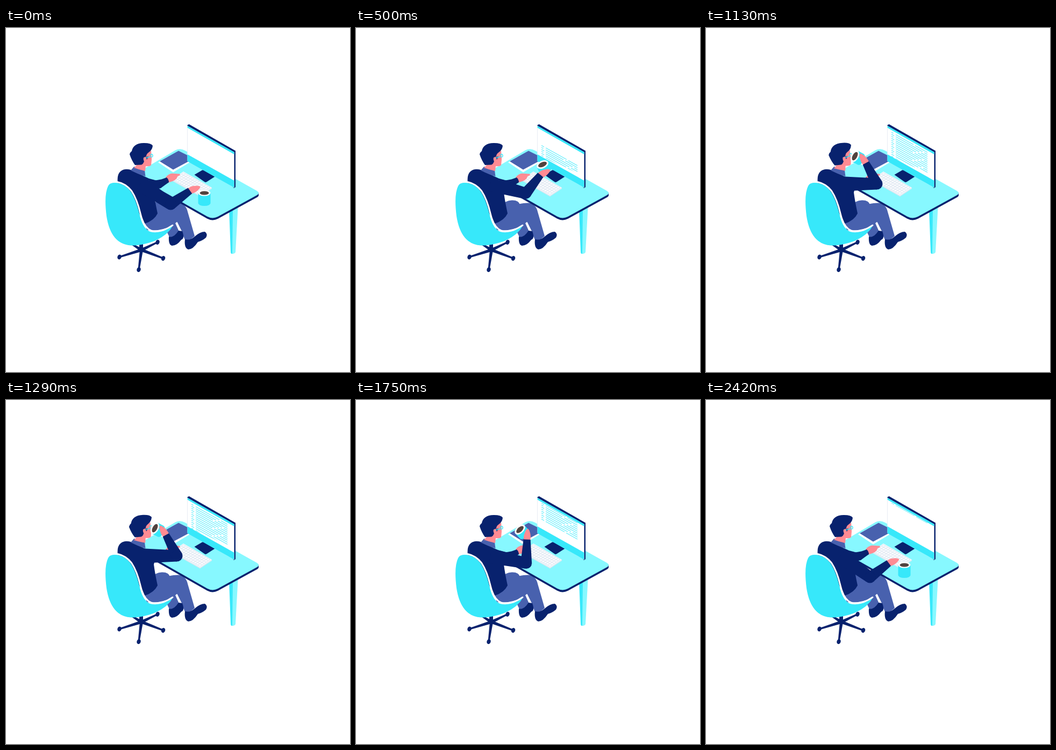
Animation of 640 by 640 pixels, one loop 2710 ms. Source, as an HTML page:

```html
<!DOCTYPE html>
<html lang="en">
<head>
<meta charset="utf-8">
<title>Coffee break</title>
<style>
  html, body { margin: 0; width: 100%; height: 100%; overflow: hidden; background: #fff; }
  svg { display: block; width: 100vw; height: 100vh; }
  .navy { fill: #08226e; }
  .indigo { fill: #4861ae; }
  .cyan { fill: #37e8fa; }
  .light { fill: #87f8ff; }
  .skin { fill: #ff8b93; }
  .white { fill: #fff; }
  .line { fill: none; stroke: #37e8fa; }
</style>
</head>
<body>
<svg viewBox="0 0 640 640">
  <defs>
    <clipPath id="page"><path d="M343 190L413 229V270L343 239Z"/></clipPath>
    <path id="top" d="M250 280V266L315 227.500Q324 223 333 228L466 302.500Q474 307 466 311.500L394 351Q384 356 374 350.500Z"/>
  </defs>

  <!-- Legs and shoes -->
  <g class="indigo">
    <path d="M270 330Q278 321 290 320.500Q303 320 305 329L322 377Q315 390 304 389L296 372Z"/>
    <path d="M257 362L283 333Q305 325 322 325.500Q335 328 338 342L351 387Q343 396 333 394L318 361L308 367Q290 379 262 376Z"/>
  </g>
  <path class="white" d="M315 363L318.500 361L327 378L322 378.500Z"/>
  <g class="navy">
    <path d="M333 393Q342 396 351 388Q361 379 370 379Q376 383 372 390Q365 396 357 398Q348 412 339 412Q331 409 333 393Z"/>
    <path d="M303 388Q312 391 321 377L328 378Q333 392 326 394Q318 405 309 405Q302 404 303 388Z"/>
  </g>

  <!-- Desk -->
  <path class="cyan" d="M415 336H423V420H420Q418 420 418 416Z"/>
  <path class="light" d="M422 334H431.500L427 417Q426 420 421 420Z"/>
  <use href="#top" class="navy" y="4"/>
  <path class="navy" d="M460 306H470V312L460 318Z"/>
  <use href="#top" class="light"/>
  <path class="white" d="M283 250L300 240L341 246V250.500L311 268.500Z"/>
  <path class="indigo" d="M286 248L321 228.500L340 238V248L311 263.500Z"/>
  <path class="navy" d="M350.500 273L365 264.500Q367 264 368 264.500L388.500 276.500L373 286.500Q371 287.500 369 286Z"/>
  <path fill="#dfe7f1" d="M308.500 282L361 311L383 297V299L361 313.500L308.500 284Z"/>
  <path fill="#fafbfd" d="M308.500 282L330 267L383 297L361 311.500Z"/>
  <path id="keys" fill="none" stroke="#d9e3ef" stroke-width=".9"/>

  <!-- Monitor -->
  <path class="navy" d="M337 181L340.500 179L427 228.500V296L424 298Z"/>
  <path class="white" d="M337.500 182L424.500 231V297L337.500 247Z"/>
  <path class="cyan" d="M337.500 182L424.500 231V235L337.500 185.500Z"/>
  <path class="cyan" d="M337.500 235L424.500 284V297L337.500 248Z"/>
  <path d="M337.500 185V235" stroke="#e4e9f1" stroke-width=".8"/>
  <g clip-path="url(#page)"><path id="text" class="line"/></g>

  <!-- Body -->
  <path class="navy" d="M208 289Q205 266 221 263Q231 262 238 267L266 280L281 284L275 306Q277 322 282 345Q276 358 258 364L230 312Z"/>
  <path class="indigo" d="M232 265L238 258Q250 260 258 265L259.500 276Q246 272 232 265Z"/>
  <g id="head">
    <path class="skin" d="M238 260Q244 256 246 248L258 236L270 228L271 245L270 255Q268 258 260 257L259 266Q249 264 238 260Z"/>
    <path class="navy" d="M230 235Q231 231 234 229Q237 214 257 214Q270 214 273 219Q272 227 266 231Q261 234 261 239L256 241Q255 246 257 248Q255 254 251 254.500L240 255Q234 247 230 235Z"/>
    <path class="navy" d="M260 240L265 239L262 245Z"/>
    <path class="line" stroke-width="1.400" d="M260 242L269 239M268.500 237.500A2.300 2.300 0 1 1 273 237.500A2.300 2.300 0 1 1 268.500 237.500"/>
  </g>

  <!-- Resting arm -->
  <path class="skin" d="M297 278Q302 271 309 270.500L323 271.500Q326 273.500 319 276Q318 282 310 285L301 288Z"/>
  <path class="navy" d="M260 280L278 283.500Q290 282 299 278Q303 282 303 287Q293 294 288 298L265 303Z"/>

  <!-- Drinking arm -->
  <g id="mug">
    <path id="cup" class="cyan"/>
    <ellipse id="rim" class="white" rx="11.500"/>
    <ellipse id="coffee" fill="#51433f" rx="8.500"/>
  </g>
  <path id="hand" class="skin" d="M-3 -5Q4 -8 11 -6Q19 -5 20.500 -1Q18 2 13 4Q6 7 -2 6Z"/>
  <g id="arm" class="navy"></g>

  <!-- Chair -->
  <path d="M251.500 400V412" stroke="#08226e" stroke-width="7"/>
  <g id="base" class="navy"></g>
  <path class="cyan" d="M190 294Q194 286 206 288Q221 290 232 304Q242 320 248 345Q254 373 268 379Q288 384 310 368C304 381 280 404 232 404.500Q195 402 187 350Q182 310 190 294Z"/>
  <path d="M189 291Q196 285 207 286.500Q222 289 233.500 303Q244 319 250 345Q256 371 270 377Q288 382 310 367" fill="none" stroke="#fff" stroke-width="3" stroke-linecap="round"/>
</svg>
<script>
const LOOP = 2710, STEP = 1000 / 24, LAST_STEP = 58;
const $ = id => document.getElementById(id);
const set = (id, name, value) => $(id).setAttribute(name, value);
const mix = (a, b, k) => a + (b - a) * k;

// Pose: upper arm, forearm and hand angles, mug x, y and tilt, lift
const rest = [34, -35, -17, 369, 307, 0, 0];
const reach = [15, -51, -24, 347, 254, -24, 1];
const raise = [11.5, -88, -82, 305, 241, -43, 1];
const sip = [0, -118, -118, 277, 238.5, -62, 1];
const away = [36, -37, -17, 369, 307, 0, 0];
const armKeys = [[0, rest], [60, rest], [500, reach], [640, raise], [800, sip],
  [1520, sip], [1750, raise], [1900, reach], [2290, rest], [2420, away]];
const headKeys = [[0, [0]], [840, [0]], [1110, [-4]], [1180, [-4]], [1460, [0]], [2420, [0]]];

// Cubic interpolation that stays flat at plateaus and turning points
function pose(keys, t) {
  let i = 0;
  while (i < keys.length - 2 && t >= keys[i + 1][0]) i++;
  const span = keys[i + 1][0] - keys[i][0], k = (t - keys[i][0]) / span;
  return keys[i][1].map((a, c) => {
    const b = keys[i + 1][1][c];
    const slope = n => {
      if (!n || n === keys.length - 1) return 0;
      const [[t0, p], [, q], [t1, r]] = keys.slice(n - 1, n + 2);
      return (q[c] - p[c]) * (r[c] - q[c]) > 0 ? (r[c] - p[c]) / (t1 - t0) * span : 0;
    };
    const curve = k * k * (3 - 2 * k);
    return mix(a, b, curve) + k * (1 - k) * ((1 - k) * slope(i) - k * slope(i + 1));
  });
}

function along([x, y], degrees, length) {
  const a = degrees * Math.PI / 180;
  return [x + Math.cos(a) * length, y + Math.sin(a) * length];
}

function limb(a, ra, b, rb) {
  const angle = Math.atan2(b[1] - a[1], b[0] - a[0]) * 180 / Math.PI;
  const points = [along(a, angle - 90, ra), along(b, angle - 90, rb),
    along(b, angle + 90, rb), along(a, angle + 90, ra)];
  return `<polygon points="${points.join(' ')}"/>`;
}

function drawKeys() {
  const at = (u, v) => [mix(311, 361, u) + 19 * v, mix(282, 309.5, u) - 13 * v].join(' ');
  let d = '';
  for (let i = 0; i <= 12; i++) d += `M${at(i / 12, 0)}L${at(i / 12, 1)}`;
  for (let i = 0; i <= 5; i++) d += `M${at(0, i / 5)}L${at(1, i / 5)}`;
  set('keys', 'd', d);
}

function drawText() {
  let d = '';
  for (let row = 0; row < 17; row++) {
    const y = row * 3.7 + 1, cut = 38 + (row * 17 + 9) % 23;
    d += `M0 ${y}H${row % 2 ? 3.5 : 5}M8 ${y}H${cut}M${cut + 3} ${y}H67`;
  }
  set('text', 'd', d);
}

function drawBase() {
  const hub = [252, 413];
  const wheels = [[211, 426], [247, 449.5], [292.5, 428.5], [282, 398.5]];
  $('base').innerHTML = limb(hub, 3, [234, 402], 1.5) + wheels.map(wheel => limb(hub, 3, wheel, 1.5) +
    `<ellipse rx="3.6" ry="4.6" transform="translate(${wheel}) rotate(20)"/>`).join('');
}

function drawArm(t) {
  const [upper, fore, hand, x, y, tilt, lift] = pose(armKeys, t);
  const shoulder = [250, 290], elbow = along(shoulder, upper, 68);
  const wrist = along(elbow, fore, 44);
  $('arm').innerHTML = limb(shoulder, 14, elbow, 10.5) + limb(elbow, 10.5, wrist, 6.5) +
    `<circle cx="${elbow[0]}" cy="${elbow[1]}" r="10.5"/>`;
  set('hand', 'transform', `translate(${wrist}) rotate(${hand})`);
  set('mug', 'transform', `translate(${x} ${y}) rotate(${tilt})`);
  const depth = mix(19, 13, lift);
  set('cup', 'd', `M-11.500 0V${depth}Q-10 ${depth + 5} 0 ${depth + 5}T11.500 ${depth}V0Z`);
  set('rim', 'ry', mix(5.5, 7, lift));
  set('coffee', 'ry', mix(3.5, 4.3, lift));
}

function frame(now) {
  const t = Math.min(LAST_STEP, Math.floor((now % LOOP + 5) / STEP)) * STEP;
  set('text', 'transform', `matrix(1 .56 0 1 345 ${240 - t * 0.045})`);
  set('head', 'transform', `rotate(${pose(headKeys, t)[0]} 252 262)`);
  drawArm(t);
  requestAnimationFrame(frame);
}

drawBase();
drawKeys();
drawText();
requestAnimationFrame(frame);
</script>
</body>
</html>
```
